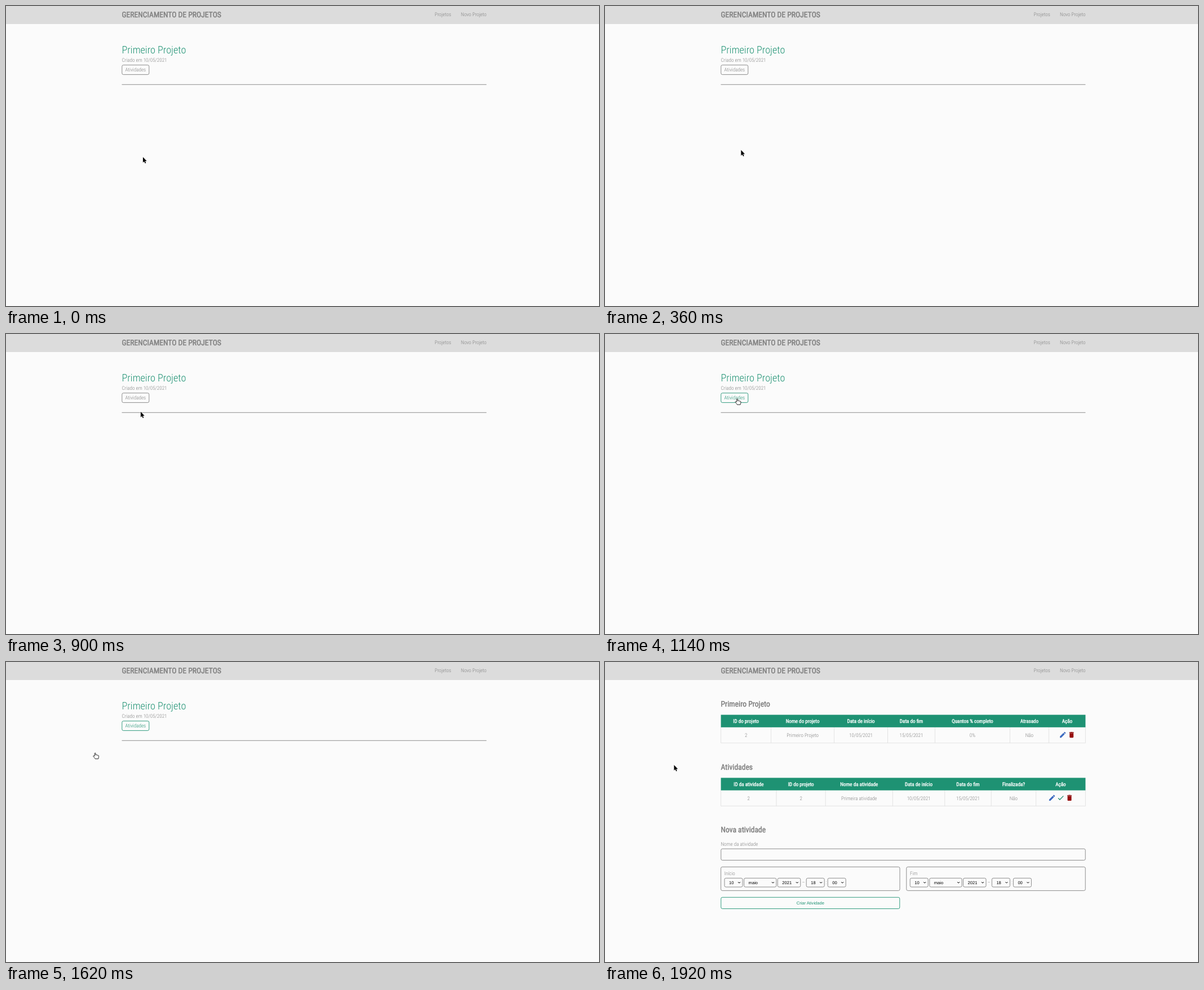
Animation of 1052 by 532 pixels, one loop 4980 ms. Source, as an HTML page:

```html
<!DOCTYPE html>
<html lang="pt-BR">
<head>
<meta charset="utf-8">
<title>Gerenciamento de Projetos</title>
<style>
html, body { margin: 0; width: 100%; height: 100%; overflow: hidden; background: #fbfbfb; }
svg { display: block; width: 1052px; height: 532px; --green: #1e9273; --gray: #808080; }
text {
  font: 300 9.1px "Roboto Condensed", Roboto, sans-serif;
  font-stretch: condensed;
  fill: var(--gray);
  text-rendering: geometricPrecision;
}
.h { font-size: 13.65px; font-weight: 400; stroke: var(--gray); stroke-width: .48px; }
.th { font-weight: 400; fill: #fff; stroke: #fff; stroke-width: .36px; }
.name { font-size: 18.2px; fill: var(--green); }
.ui { font: 400 7.58px "Liberation Sans", Arial, sans-serif; fill: #000; }
.ok { fill: var(--green); }
.box { fill: none; stroke: var(--gray); stroke-width: .9; }
.box.ok { stroke: var(--green); }
.grid { fill: none; stroke: #dedede; stroke-width: .8; }
.icon { filter: drop-shadow(.7px .8px .5px rgba(0, 0, 0, .3)); }
.hover .box { stroke: var(--green); }
.hover text { fill: var(--green); }
.cursor { filter: drop-shadow(.3px .8px .7px rgba(0, 0, 0, .3)); }
</style>
</head>
<body>
<svg id="stage" viewBox="0 0 1052 532"></svg>
<script>
const LOOP = 4980, STEP = 60, HOVER = 1140, SWAP = 1680, BAR_END = 1920;
const stage = document.getElementById('stage');

const text = (x, y, s, cls = '', anchor = 'start') =>
  `<text class="${cls}" data-x="${x}" data-y="${y}" text-anchor="${anchor}">${s}</text>`;
const mid = (x, y, s, cls) => text(x, y, s, cls, 'middle');
const box = (x, y, w, h, cls = '') =>
  `<rect class="box ${cls}" x="${x}" y="${y}" width="${w}" height="${h}" rx="2.5"/>`;

const icons = {
  edit: ['#3b6bc4', 'M3 17.25V21h3.75L17.81 9.94l-3.75-3.75zM20.71 7.04c.39-.39.39-1.02 0-1.41l-2.34-2.34c-.39-.39-1.02-.39-1.41 0l-1.83 1.83 3.75 3.75z'],
  done: ['#1e9273', 'M9 16.17L4.83 12l-1.42 1.41L9 19 21 7l-1.41-1.41z'],
  trash: ['#980b0b', 'M6 19c0 1.1.9 2 2 2h8c1.1 0 2-.9 2-2V7H6zM19 4h-3.5l-1-1h-5l-1 1H5v2h14z']
};
const icon = (name, x, y) => {
  const [fill, d] = icons[name];
  return `<g class="icon" transform="translate(${x - 6.8} ${y - 6.8}) scale(.5687)"><path fill="${fill}" d="${d}"/></g>`;
};

function table(y, cols, heads, cells, actions) {
  const left = cols[0], right = cols[cols.length - 1], top = y + 22.2, end = y + 50;
  const center = i => (cols[i] + cols[i + 1]) / 2;
  const lines = cols.map(x => `M${x} ${top}V${end}`).join('') + `M${left} ${end}H${right}`;
  return `<path class="grid" d="${lines}"/>` +
    `<rect class="ok" x="${left}" y="${y}" width="${right - left}" height="22.2"/>` +
    heads.map((s, i) => mid(center(i), y + 14.2, s, 'th')).join('') +
    cells.map((s, i) => mid(center(i), y + 39.2, s)).join('') +
    actions.map((a, i) =>
      icon(a, center(cells.length) + (i - (actions.length - 1) / 2) * 15.5, y + 35.5)).join('');
}

const select = (x, w, s) => box(x, 383.3, w, 15.7) + text(x + 8, 393.8, s, 'ui') +
  `<path d="M${x + w - 8} 390l2 2.1 2-2.1" fill="none" stroke="#000" stroke-width="1"/>`;

const dateField = (x, label) => `<g transform="translate(${x} 0)">` +
  box(0, 363.4, 317.4, 42) + text(6.2, 378, label) +
  select(6.4, 32, '10') + select(41, 57.3, 'maio') + select(100.7, 40.5, '2021') +
  mid(146.4, 393.8, '–') + select(151.6, 32, '18') + mid(187, 393.8, ':') +
  select(189.6, 32, '00') + '</g>';

stage.innerHTML = `
  <rect width="1052" height="532" fill="#fbfbfb"/>
  <rect width="1052" height="32" fill="#dcdcdc"/>
  ${text(205.5, 20, 'GERENCIAMENTO DE PROJETOS', 'h')}
  ${text(760.5, 17.7, 'Projetos')}
  ${text(852.5, 17.7, 'Novo Projeto', '', 'end')}
  <g id="list">
    ${text(205.5, 83.6, 'Primeiro Projeto', 'name')}
    ${text(205.5, 99.4, 'Criado em 10/05/2021')}
    <g id="button">${box(205.8, 104.7, 48, 16.9)}${mid(229.8, 116.4, 'Atividades')}</g>
    <path class="box" d="M205.5 139.3H852.4"/>
  </g>
  <g id="detail">
    ${text(205.5, 79, 'Primeiro Projeto', 'h')}
    ${table(93.6, [205.6, 294.6, 406.6, 501.5, 585.4, 718.4, 787.4, 852.4],
      ['ID do projeto', 'Nome do projeto', 'Data de início', 'Data do fim', 'Quantos % completo', 'Atrasado', 'Ação'],
      [2, 'Primeiro Projeto', '10/05/2021', '15/05/2021', '0%', 'Não'], ['edit', 'trash'])}
    ${text(205.5, 190.8, 'Atividades', 'h')}
    ${table(205.4, [205.6, 304, 391.2, 510.4, 602.7, 685.2, 764.6, 852.4],
      ['ID da atividade', 'ID do projeto', 'Nome da atividade', 'Data de início', 'Data do fim', 'Finalizada?', 'Ação'],
      [2, 2, 'Primeira atividade', '10/05/2021', '15/05/2021', 'Não'], ['edit', 'done', 'trash'])}
    ${text(205.5, 302.4, 'Nova atividade', 'h')}
    ${text(205.5, 325.8, 'Nome da atividade')}
    ${box(205.8, 331.3, 646.4, 20.2)}
    ${dateField(205.6, 'Início')}
    ${dateField(534.8, 'Fim')}
    ${box(205.8, 417.3, 317, 20.2, 'ok')}
    ${mid(364.3, 430.1, 'Criar Atividade', 'ui ok')}
  </g>
  <rect id="bar" height="1.7" fill="#0076ff"/>
  <g id="arrow" class="cursor">
    <path d="M0 0V9.6L2.2 7.6 3.7 11 5.2 10.3 3.7 7H6.6Z" fill="#000" stroke="#fff" stroke-width=".7" paint-order="stroke"/>
  </g>
  <g id="hand" class="cursor">
    <path d="M-1 5.4V1C-1-.3 .8-.3 .8 1V3.7C1.2 3 2.6 3.1 2.7 4 3.3 3.4 4.5 3.6 4.6 4.5 5.5 4 6.2 4.4 6.2 5.4V7.3C6.2 8.4 5.5 9 5.4 10.4H-.1C-.5 9.1-2.1 7.8-3.3 6.2-4 5-2.5 4.2-1 5.9" fill="#fff" stroke="#111" stroke-width=".85" stroke-linejoin="round"/>
  </g>`;

const $ = id => document.getElementById(id);
const [list, detail, button, bar, arrow, hand] =
  ['list', 'detail', 'button', 'bar', 'arrow', 'hand'].map($);

// Without a condensed face, narrow the regular one by a single ratio.
const narrow = 113.2 / stage.querySelector('.name').getComputedTextLength();
const ratio = narrow < .95 ? narrow : 1;
for (const el of stage.querySelectorAll('text')) {
  const k = el.classList.contains('ui') ? 1 : ratio;
  el.setAttribute('transform', `translate(${el.dataset.x} ${el.dataset.y}) scale(${k} 1)`);
}

// Pointer path: time, x, y
const path = [
  [0, 243, 268], [120, 242.7, 266.5], [240, 242.2, 262.6], [360, 241.4, 255.6],
  [480, 240.8, 242], [540, 240.6, 231.5], [660, 240.2, 200], [780, 239.8, 164],
  [900, 239, 138], [1020, 236.2, 121.5], [1080, 234.8, 116.2], [1200, 234.5, 113.6],
  [1380, 234.5, 113.6], [1440, 234.4, 113.8], [1500, 221, 122], [1560, 194, 139],
  [1620, 158.3, 161.3], [1680, 122.5, 182.7], [LOOP, 122.5, 182.7]
];

function pointAt(t) {
  const i = path.findIndex(p => p[0] > t);
  const a = path[i - 1], b = path[i], p = (t - a[0]) / (b[0] - a[0]);
  return [a[1] + (b[1] - a[1]) * p, a[2] + (b[2] - a[2]) * p];
}

const show = (el, on) => el.setAttribute('visibility', on ? 'visible' : 'hidden');

function draw(t) {
  const loaded = t >= SWAP, hover = t >= HOVER && !loaded;
  show(list, !loaded);
  show(detail, loaded);
  show(hand, hover);
  show(arrow, !hover);
  button.setAttribute('class', hover ? 'hover' : '');

  const [x, y] = pointAt(t);
  (hover ? hand : arrow).setAttribute('transform', `translate(${x} ${y})`);

  const p = (t - SWAP) / (BAR_END - SWAP);
  show(bar, p >= 0 && p < 1);
  bar.setAttribute('width', 575 + 477 * Math.max(0, Math.min(1, p)));
  bar.setAttribute('opacity', .13 * (1 - p));
}

const start = performance.now();
function tick() {
  const t = (performance.now() - start) % LOOP;
  draw(Math.floor(t / STEP) * STEP);
  requestAnimationFrame(tick);
}
tick();
</script>
</body>
</html>
```
